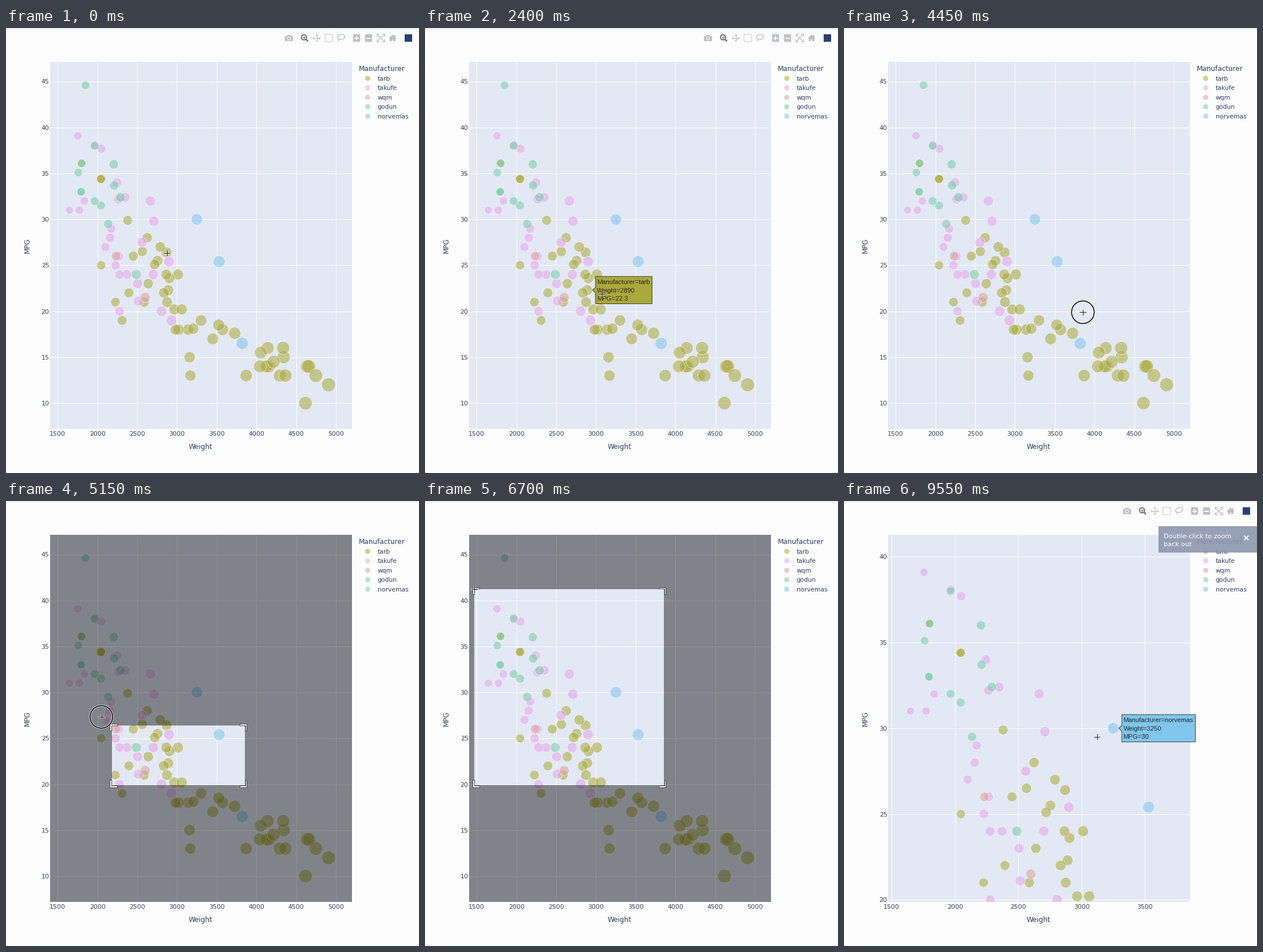
Write a matplotlib script that moves like this. It is 721 px wide and 777 px high and loops after 9.6 s.

```python
import numpy as np
import matplotlib.pyplot as plt
from matplotlib.animation import FuncAnimation
from matplotlib.patches import Circle, Ellipse, PathPatch, Polygon, Rectangle
from matplotlib.path import Path

W, H, DPI = 721, 777, 100
STEP, FRAMES = 50, 192
PT = 72 / DPI
INK, PAPER, PANEL = "#2a3f5f", "#fefdfe", "#e2e8f4"
GREY, DARK = "#bcbfc6", "#70747c"
LEFT, RIGHT, TOP, BOTTOM = 77, 603.5, 59, 700
MARK_ALPHA = 0.55

# Key moments in ms
PRESS, RELEASE, ZOOMED = 4450, 6650, 6750
HOVER_FROM, HOVER_REACH, DRAG_LAG = 150, 23, 80
DRAG_START = (417, 496.3)

MAKERS = {"tarb": "#aba93b", "takufe": "#e4a6ea", "wqm": "#dca29d",
          "godun": "#79cca8", "norvemas": "#80c5ee"}

# Weights and mileages for each maker
CARS = {
    "tarb": (
        [3449, 4341, 2587, 4615, 2046, 3302, 4154, 3139, 2226, 4129, 4294,
         2395, 4042, 4363, 4906, 3021, 2310, 4141, 4638, 2451, 3158, 4657,
         3169, 2639, 2984, 4215, 3012, 3574, 2565, 3870, 3525, 4335, 2755,
         1800, 2965, 2720, 3205, 2890, 3725, 4054, 2870, 2905, 2045, 2045,
         2380, 3060, 2865, 2835, 2790, 2625, 4746, 2875],
        [17, 15, 21, 10, 25, 19, 14, 18, 21, 14, 13,
         22, 14, 13, 12, 18, 19, 16, 14, 26, 15, 14,
         13, 23, 18, 14.5, 24, 18, 26.5, 13, 18.5, 16, 25.5,
         36.1, 20.2, 25.1, 18.1, 22.3, 17.6, 15.5, 26.4, 23.6, 34.4, 34.4,
         29.9, 20.2, 24, 22, 27, 28, 13, 21]),
    "takufe": (
        [2372, 2228, 1773, 2278, 2506, 2100, 2279, 1836, 2807, 1649, 2171,
         2702, 2155, 2930, 2265, 2560, 2515, 1968, 2265, 2711, 1755, 2050,
         2350, 2900, 2665, 2245],
        [24, 25, 31, 24, 23, 27, 20, 32, 20, 31, 29,
         24, 28, 19, 26, 27.5, 21.1, 38.1, 32.2, 29.8, 39.1, 37.7,
         32.4, 25.4, 32, 34]),
    "wqm": ([2234, 2600], [26, 21.5]),
    "godun": (
        [2489, 1795, 1795, 2045, 1800, 2135, 1850, 2290, 1760, 2210, 2205,
         1965, 1965],
        [24, 33, 33, 31.5, 36.1, 29.5, 44.6, 32.4, 35.1, 33.7, 36, 38, 32]),
    "norvemas": ([3820, 3530, 3250], [16.5, 25.4, 30]),
}
MAKER = np.repeat(list(CARS), [len(c[0]) for c in CARS.values()])
WEIGHT = np.concatenate([c[0] for c in CARS.values()])
MPG = np.concatenate([c[1] for c in CARS.values()])
RADIUS = 12 * np.sqrt(WEIGHT / WEIGHT.max())

# Pointer stops: time, x, y
STOPS = np.array([
    (0, 280.5, 392.5), (500, 280.5, 392.5), (1050, 266, 414),
    (1700, 287, 441), (2400, 309, 464), (2900, 358, 472),
    (3650, 402, 475), (4250, *DRAG_START), (4500, *DRAG_START),
    (5070, 184.5, 392), (5150, 166.5, 377), (5700, 108, 232),
    (6400, 86.3, 154), (6850, 86.3, 154), (7650, 503.5, 406),
    (8400, 487, 399), (9000, 455, 409), (9550, 441.5, 411.5)]).T


def pointer(t):
    """Smooth path through the stops without overshoot."""
    ts = STOPS[0]
    i = int(np.clip(np.searchsorted(ts, t, side="right") - 1, 0, len(ts) - 2))
    dt = ts[i + 1] - ts[i]
    u = (t - ts[i]) / dt
    place = []
    for vs in STOPS[1:]:
        s = np.concatenate([[0], np.diff(vs) / np.diff(ts), [0]])
        a, b = s[:-1], s[1:]
        same = a * b > 0
        m = np.where(same, 2 * a * b / np.where(same, a + b, 1), 0)
        place.append((1 + 2 * u) * (1 - u) ** 2 * vs[i]
                     + u * (1 - u) ** 2 * dt * m[i]
                     + u * u * (3 - 2 * u) * vs[i + 1]
                     + u * u * (u - 1) * dt * m[i + 1])
    return place


fig = plt.figure(figsize=(W / DPI, H / DPI), dpi=DPI, facecolor=PAPER)
ax = fig.add_axes([0, 0, 1, 1])
ax.set_xlim(0, W)
ax.set_ylim(H, 0)
ax.axis("off")


def add(artist, z):
    artist.set_zorder(z)
    return ax.add_artist(artist)


def line(xs, ys, color, width, z, **kw):
    kw.setdefault("solid_capstyle", "butt")
    return ax.plot(xs, ys, color=color, lw=width * PT, zorder=z, **kw)[0]


def label(x, y, s, px, ha="left", color=INK, font="DejaVu Sans", z=3):
    """Text whose capitals are centred on y."""
    return ax.text(x, y + 0.36 * px, s, fontsize=px * PT, ha=ha, color=color,
                   family=font, va="baseline", zorder=z)


def box(x, y, w, h, color, z, **kw):
    return add(Rectangle((x, y), w, h, fc=color, ec="none", **kw), z)


class View:
    """One zoom state of the chart."""

    def __init__(self, x0, kx, y0, top, ky, xticks, yticks):
        self.x = x0 + (WEIGHT - 1500) * kx
        self.y = y0 + (top - MPG) * ky
        self.parts = []
        for v in xticks:
            px = x0 + (v - 1500) * kx
            self.parts += [line([px, px], [TOP, BOTTOM], "white", 1, 2),
                           label(px, 708, str(v), 11, "center")]
        for v in yticks:
            py = y0 + (top - v) * ky
            self.parts += [line([LEFT, RIGHT], [py, py], "white", 1, 2),
                           label(75.5, py, str(v), 11, "right")]
        dots = ax.scatter(self.x, self.y, s=(2 * RADIUS * PT) ** 2,
                          c=[MAKERS[m] for m in MAKER], edgecolors="white",
                          linewidths=PT, alpha=MARK_ALPHA, zorder=4)
        dots.set_clip_path(panel)
        self.parts.append(dots)

    def show(self, on):
        for p in self.parts:
            p.set_visible(on)

    def nearest(self, x, y):
        gap = np.hypot(self.x - x, self.y - y) - RADIUS
        i = int(np.argmin(gap))
        return i if gap[i] < HOVER_REACH else None


def make_toolbar():
    y = 17.5
    parts = []

    def shape(patch, z=6):
        parts.append(add(patch, z))

    def fill(x, top, w, h, color=GREY):
        parts.append(box(x, top, w, h, color, 6))

    def stroke(xs, ys, color=GREY, width=1.3, **kw):
        parts.append(line(xs, ys, color, width, 7, **kw))

    def arrow(x, y0, dx, dy, size):
        nx, ny = -dy, dx
        shape(Polygon([(x, y0),
                       (x - size * (dx + nx), y0 - size * (dy + ny)),
                       (x - size * (dx - nx), y0 - size * (dy - ny))],
                      fc=GREY, ec="none"))

    # camera
    fill(487, 13.5, 14, 9.5)
    fill(491, 11.8, 6, 3)
    shape(Circle((494, 18.1), 3.3, fc=PAPER, ec="none"))
    shape(Circle((494, 18.1), 2.1, fc=GREY, ec="none"))
    # magnifier
    shape(Circle((520.3, 16.3), 4.4, fc="none", ec=DARK, lw=2 * PT))
    stroke([523.5, 527.3], [19.5, 23.3], DARK, 2.6)
    stroke([518, 522.6], [16.3, 16.3], DARK, 1.2)
    stroke([520.3, 520.3], [14, 18.6], DARK, 1.2)
    # pan
    stroke([537, 548], [y, y])
    stroke([542.5, 542.5], [12, 23])
    for dx, dy in [(1, 0), (-1, 0), (0, 1), (0, -1)]:
        arrow(542.5 + 7 * dx, y + 7 * dy, dx, dy, 2.6)
    # box select
    stroke([557.3, 569.7, 569.7, 557.3, 557.3],
           [11.3, 11.3, 23.7, 23.7, 11.3], width=1.5, dashes=(1.3, 0.9))
    # lasso
    shape(Ellipse((585, 15.8), 13, 8.5, angle=-12, fc="none", ec=GREY,
                  lw=1.4 * PT))
    stroke([580, 582, 581, 579.5], [18.5, 20.2, 22, 23.5])
    # zoom in and out
    for x in (612, 633):
        fill(x - 6.3, y - 6.3, 12.6, 12.6)
        stroke([x - 3.8, x + 3.8], [y, y], PAPER, 2)
    stroke([612, 612], [y - 3.8, y + 3.8], PAPER, 2)
    # autoscale
    for sx in (-1, 1):
        stroke([654 - 5 * sx, 654 + 5 * sx], [y - 5, y + 5])
        for sy in (-1, 1):
            cx, cy = 654 + 6.5 * sx, y + 6.5 * sy
            stroke([cx - 4 * sx, cx, cx], [cy, cy, cy - 4 * sy], width=1.6)
    # home
    shape(Polygon([(668, 18.3), (675, 11.3), (682, 18.3)], fc=GREY, ec="none"))
    fill(670.2, 17.5, 3.5, 5.8)
    fill(676.3, 17.5, 3.5, 5.8)
    fill(670.2, 16.5, 9.6, 3.3)
    fill(678, 12, 1.8, 4)
    # badge
    fill(696, 11, 13, 13, "#29416b")
    return parts


line([0, W], [0.5, 0.5], "#d9d9dd", 1, 1)
panel = box(LEFT, TOP, RIGHT - LEFT, BOTTOM - TOP, PANEL, 1)
full = View(90.2, 0.13886, 93.5, 45, 16.043,
            range(1500, 5001, 500), range(10, 46, 5))
near = View(83.2, 0.221, 97.3, 40, 29.95,
            range(1500, 3501, 500), range(20, 41, 5))
label(340, 731, "Weight", 12, "center")
ax.text(37, 380, "MPG", fontsize=12 * PT, color=INK, rotation=90, ha="center",
        va="center", family="DejaVu Sans")
label(615.5, 71, "Manufacturer", 12)
for k, (name, color) in enumerate(MAKERS.items()):
    ly = 88 + 16.5 * k
    add(Circle((631.5, ly), 4.7, fc=color, ec="white", lw=PT,
               alpha=MARK_ALPHA), 3)
    label(648.5, ly, name, 10.8)

toolbar = make_toolbar()

# Zoom rectangle
shade = add(PathPatch(Path([(0, 0), (1, 1)]), fc="black", ec="none"), 8)
brackets = [add(Polygon([(0, 0), (1, 1), (0, 1)], fc="white", ec="#444444",
                        lw=PT), 9) for _ in range(4)]

# Hover label
bubble = add(Polygon([(0, 0), (1, 1), (0, 1)], ec="#3c3c34", lw=PT), 10)
rows = [label(0, 0, "", 11.3, color="#262626", font="Liberation Sans", z=11)
        for _ in range(3)]

# Notice
notice = box(548.5, 44, W - 548.5, 46, "#8c97af", 12)
notice_ink = [
    label(557.5, 60.5, "Double-click to zoom", 11.2, color="white", z=13),
    label(557.5, 74.5, "back out", 11.2, color="white", z=13),
    line([698.5, 706], [60.7, 68.2], "white", 2, 13),
    line([698.5, 706], [68.2, 60.7], "white", 2, 13)]

# Pointer
ring_halo = add(Circle((0, 0), 19.7, fc="none", ec="white", lw=3.4 * PT,
                       alpha=0.8), 14)
ring = add(Circle((0, 0), 19.7, fc="none", ec="black", lw=1.6 * PT), 15)
cross_halo = line([], [], "white", 2.8, 16, alpha=0.7)
cross = line([], [], "#1c1c1c", 1.1, 17)


def set_selection(t):
    on = PRESS <= t < ZOOMED
    x, y = pointer(t - DRAG_LAG)
    l, r = sorted((x, DRAG_START[0]))
    top, b = sorted((y, DRAG_START[1]))
    on = on and r - l > 4
    for a in [shade, *brackets]:
        a.set_visible(on)
    if not on:
        return
    outer = [(LEFT, TOP), (RIGHT, TOP), (RIGHT, BOTTOM), (LEFT, BOTTOM),
             (LEFT, TOP)]
    inner = [(l, top), (l, b), (r, b), (r, top), (l, top)]
    codes = [Path.MOVETO] + [Path.LINETO] * 3 + [Path.CLOSEPOLY]
    shade.set_path(Path(outer + inner, codes * 2))
    shade.set_alpha(0.43 * min(1, (t - PRESS) / 200))
    n = min(9.2, (r - l) / 2, (b - top) / 2)
    corners = [(l, top, -1, -1), (r, top, 1, -1), (r, b, 1, 1), (l, b, -1, 1)]
    for p, (cx, cy, sx, sy) in zip(brackets, corners):
        ell = [(0.5, -n), (3.2, -n), (3.2, 3.2), (-n, 3.2), (-n, 0.5),
               (0.5, 0.5)]
        p.set_xy([(cx + sx * u, cy + sy * v) for u, v in ell])


def set_hover(t, view, x, y):
    free = t >= HOVER_FROM and not PRESS <= t < ZOOMED
    i = view.nearest(x, y) if free else None
    for a in [bubble, *rows]:
        a.set_visible(i is not None)
    if i is None:
        return
    tip, cy = view.x[i] + RADIUS[i], view.y[i]
    l = tip + 5.3
    lines = [f"Manufacturer={MAKER[i]}", f"Weight={WEIGHT[i]:g}",
             f"MPG={MPG[i]:g}"]
    for k, (row, s) in enumerate(zip(rows, lines)):
        row.set_text(s)
        row.set_position((l + 2.6, cy + 14.5 * (k - 1) + 4.1))
    extent = rows[0].get_window_extent(fig.canvas.get_renderer())
    r = l + extent.width * DPI / fig.dpi + 6
    bubble.set_xy([(tip, cy), (l, cy - 5), (l, cy - 23.8), (r, cy - 23.8),
                   (r, cy + 23.8), (l, cy + 23.8), (l, cy + 5)])
    bubble.set_facecolor(MAKERS[MAKER[i]])


def draw(n):
    t = n * STEP
    x, y = pointer(t)
    zoomed = t >= ZOOMED
    full.show(not zoomed)
    near.show(zoomed)
    for a in toolbar:
        a.set_visible(not PRESS <= t < ZOOMED)
    set_selection(t)
    set_hover(t, near if zoomed else full, x, y)

    fade = float(np.clip((t - ZOOMED) / 500, 0, 1))
    notice.set_alpha(0.9 * fade)
    for a in notice_ink:
        a.set_alpha(fade)

    for c in (ring_halo, ring):
        c.set_center((x, y))
        c.set_visible(PRESS <= t < RELEASE)
    for c, arm in ((cross_halo, 6.2), (cross, 5.7)):
        c.set_data([x - arm, x + arm, np.nan, x, x],
                   [y, y, np.nan, y - arm, y + arm])
    return []


anim = FuncAnimation(fig, draw, frames=FRAMES, interval=STEP, repeat=True)
plt.show()
```
